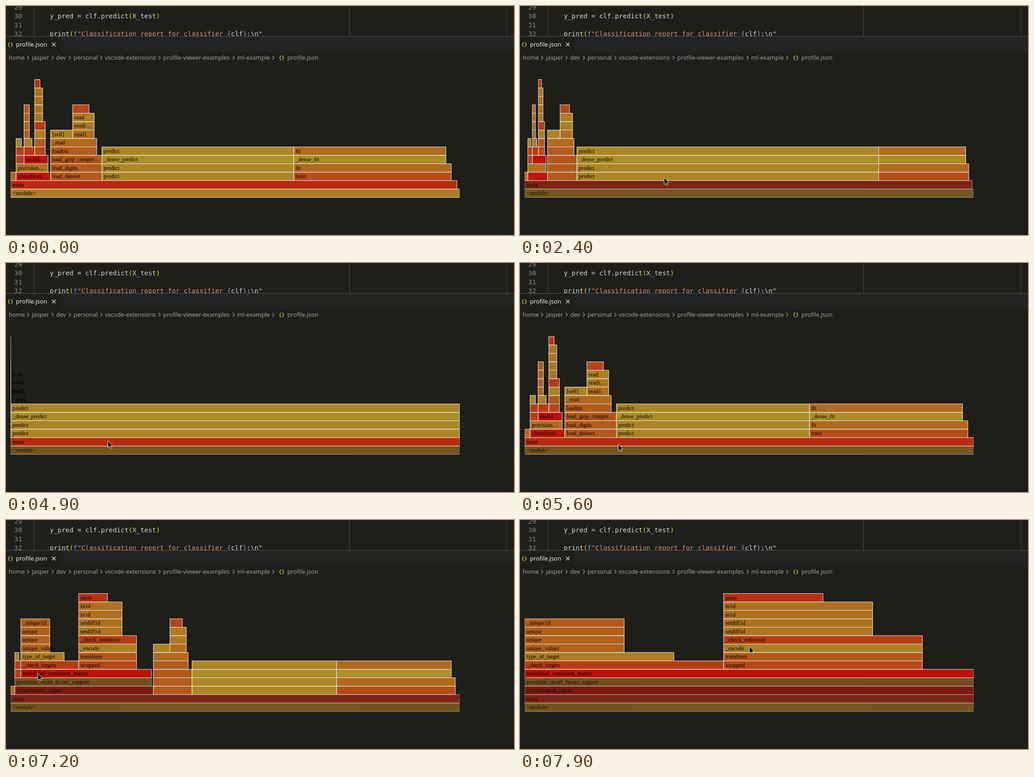
Recreate the animation shown at these times as an HTML page. Size 1114 px wide and 503 px high, loop 8 s.

```html
<!DOCTYPE html>
<html lang="en">
<head>
<meta charset="utf-8">
<title>Flame graph zoom</title>
<style>
  html, body { margin: 0; width: 100%; height: 100%; overflow: hidden; background: #1e1e1a; }
  #stage { display: block; width: 1114px; height: 503px; }
  text { white-space: pre; }
  .code { font: 14.35px "DejaVu Sans Mono", monospace; fill: #d4d4d4; }
  .num { fill: #858585; }
  .paren { fill: #ffd700; }
  .str { fill: #ce9178; }
  .brace { fill: #c586c0; }
  .ui { font: 13.05px "Open Sans", "Noto Sans", sans-serif; fill: #a9a9a6; }
  .icon { font: bold 11px "DejaVu Sans Mono", monospace; fill: #c5bd3c; }
  .graph rect { stroke: #eee; stroke-width: 1; fill-opacity: .8; }
  .graph text { font: 12.35px "Liberation Serif", serif; fill: #000; }
</style>
</head>
<body>
<svg id="stage" viewBox="0 0 1114 503">
  <defs>
    <clipPath id="pane"><rect width="1114" height="66"/></clipPath>
    <clipPath id="chart"><rect x="10.5" y="130" width="984" height="291"/></clipPath>
  </defs>
  <rect width="1114" height="503" fill="#1e1e1a"/>

  <g class="code" clip-path="url(#pane)">
    <path d="M62 0V66M1098.500 0V66" stroke="#484846"/>
    <path d="M753.500 0V66" stroke="#50504e"/>
    <g class="num">
      <text x="18" y="7.500">29</text>
      <text x="18" y="27">30</text>
      <text x="18" y="46.500">31</text>
      <text x="18" y="66">32</text>
    </g>
    <text x="96" y="26.500">y_pred = clf.predict<tspan class="paren">(</tspan>X_test<tspan class="paren">)</tspan></text>
    <text x="96" y="66">print<tspan class="paren">(</tspan><tspan fill="#569cd6">f</tspan><tspan class="str">"Classification report for classifier </tspan><tspan class="brace">{</tspan>clf<tspan class="brace">}</tspan>:\n"</text>
  </g>

  <rect x="119.500" y="68" width="995" height="33.500" fill="#222423"/>
  <rect y="66" width="1114" height="1.500" fill="#484846"/>
  <text class="icon" x="3" y="88">{}</text>
  <text class="ui" x="22" y="89" style="fill:#fff">profile.json</text>
  <path d="M101 80.500l8 8m0-8l-8 8" stroke="#e4e4e2" stroke-width="1.300"/>
  <g id="crumbs"></g>
  <text class="icon" x="598" y="117">{}</text>

  <g id="graph" class="graph" clip-path="url(#chart)"></g>
  <path id="cursor" d="M0 0V15.500L3.600 12.200L6 17.300L8.200 16.300L6 11.300H10.800Z"
        fill="#0c0c0c" stroke="#e8e8e8" stroke-linejoin="round"/>
</svg>
<script>
const LOOP = 8000, STEP = 100, ZOOM_MS = 750, LAG = 2;
const LEFT = 10.5, WIDTH = 984, ROW = 18.5, BASE_Y = 402;
const MIN_LABEL = 38, PAD = 4;

const $ = id => document.getElementById(id);
const clamp = v => Math.min(1, Math.max(0, v));
const lerp = (a, b, k) => a + (b - a) * k;
const ease = k => k < .5 ? 4 * k ** 3 : 1 - 4 * (1 - k) ** 3;

function add(parent, tag, attrs = {}, text = '') {
  const el = document.createElementNS('http://www.w3.org/2000/svg', tag);
  for (const key in attrs) el.setAttribute(key, attrs[key]);
  el.textContent = text;
  return parent.appendChild(el);
}

// Breadcrumbs
const crumbs = [['home', 6], ['jasper', 57], ['dev', 110], ['personal', 148],
  ['vscode-extensions', 217], ['profile-viewer-examples', 345], ['ml-example', 507],
  ['profile.json', 617]];
for (const [word, x] of crumbs) add($('crumbs'), 'text', { class: 'ui', x, y: 118 }, word);
for (const x of [48.5, 102, 140, 209, 336.5, 499, 586])
  add($('crumbs'), 'path', { d: `M${x - 2} 109.5l4 4l-4 4`, fill: 'none', stroke: '#a0a09e', 'stroke-width': 1.1 });

// Call tree: [name, samples, heat, ...children]; a lower heat is redder.
const chain = (...nodes) => nodes.reduceRight((child, node) => child ? [...node, child] : node, null);

const targets = chain(['_check_targets', 4, 60], ['type_of_target', 3, 127], ['unique_values', 2, 97],
  ['unique', 2, 98], ['unique', 2, 96], ['_unique1d', 2, 90]);
const wrapped = chain(['wrapped', 4, 72], ['transform', 4, 90], ['_encode', 4, 128],
  ['_check_unknown', 4, 60], ['setdiff1d', 3, 117], ['setdiff1d', 3, 115],
  ['in1d', 3, 112], ['in1d', 3, 113], ['amin', 2, 48]);
const checks = chain(['', 3, 62], ['', 3, 62], ['', 2, 128]);
const report = chain(['classification_report', 13, 22], ['precision_recall_fscore_support', 12.03, 112,
  checks, ['multilabel_confusion_matrix', 9.03, 17, targets, wrapped]]);
const reader = chain(['read1', 8.15, 110], ['readinto', 8.15, 124], ['read', 8.15, 124], ['', 6.2, 68]);
const load = chain(['load_dataset', 19.36, 90], ['load_digits', 19.36, 92],
  ['load_gzip_compressed_csv', 19.36, 88], ['loadtxt', 17.4, 92],
  ['_read', 17.4, 106, ['[self]', 8.3, 130], reader]);
const predict = chain(['predict', 72.31, 133], ['predict', 72.31, 133],
  ['_dense_predict', 72.31, 142], ['predict', 72.31, 133]);
const train = chain(['train', 59.36, 77], ['fit', 59.36, 106], ['_dense_fit', 57.36, 142], ['fit', 57.36, 106]);
const tree = ['<module>', 169.16, 124, ['main', 168.16, 43, ['', 2, 106], report, load, predict, train]];

// The fill is drawn at 80% over the page, so the page's share is taken out first.
function fill(heat) {
  const shown = [190 - (heat - 17) * .15, heat, 12 + (heat - 17) * .22];
  const page = [30, 30, 26];
  return `rgb(${shown.map((c, i) => Math.round((c - .2 * page[i]) / .8))})`;
}

const nodes = [];
function build([name, size, heat, ...kids], from, depth) {
  const y = BASE_Y - ROW * depth;
  const g = add($('graph'), 'g');
  const rect = add(g, 'rect', { y, height: ROW, fill: fill(heat) });
  const label = add(g, 'text', { y: y + 13.2 });
  nodes.push({ name, from, to: from + size, depth, g, rect, label });
  for (const kid of kids) {
    build(kid, from, depth + 1);
    from += kid[1];
  }
}
build(tree, 0, 0);

const pen = document.createElement('canvas').getContext('2d');
pen.font = '12.35px "Liberation Serif", serif';
function fit(text, room) {
  const wide = s => pen.measureText(s).width > room;
  if (!wide(text)) return text;
  while (text && wide(text + '…')) text = text.slice(0, -1);
  return text + '…';
}

// Position of every node when one node fills the chart
function layout(focus) {
  const place = v => clamp((v - focus.from) / (focus.to - focus.from)) * WIDTH;
  return nodes.map(n => {
    const x = place(n.from), w = place(n.to) - x;
    return {
      x: LEFT + x, w,
      text: w < MIN_LABEL ? '' : fit(n.name, w - 2 * PAD),
      faded: n.depth < focus.depth && w > WIDTH - .01
    };
  });
}

const named = name => nodes.find(n => n.name === name);
const views = [[-ZOOM_MS - LAG, '<module>'], [2042, 'predict'], [4890, 'main'], [6900, 'multilabel_confusion_matrix']]
  .map(([at, name]) => ({ at, boxes: layout(named(name)) }));

// Pointer moves: [start, end, x, y]
const moves = [
  [400, 500, 633, 45], [500, 600, 499.5, 212], [700, 900, 363.5, 308], [1000, 1100, 362.5, 310],
  [1200, 1500, 316, 375], [1700, 1800, 316, 377], [2700, 2900, 300, 328], [3100, 3400, 243, 341],
  [3500, 3700, 239, 349], [3800, 4000, 224, 404], [4200, 4300, 223.5, 390.5], [5400, 5600, 215.5, 397.5],
  [5600, 5700, 127, 377], [5700, 6400, 69.5, 336.5], [7700, 7900, 503, 277.5]
];

function drawGraph(now) {
  const i = views.findLastIndex(v => now >= v.at);
  const next = views[i].boxes, prev = views[Math.max(0, i - 1)].boxes;
  const k = ease(clamp((now - views[i].at - LAG) / ZOOM_MS));
  nodes.forEach((n, j) => {
    const a = prev[j], b = next[j], x = lerp(a.x, b.x, k);
    n.rect.setAttribute('x', x);
    n.rect.setAttribute('width', Math.max(0, lerp(a.w, b.w, k)));
    n.label.setAttribute('x', x + PAD);
    if (n.label.textContent !== b.text) n.label.textContent = b.text;
    n.g.setAttribute('opacity', b.faded ? .6 : 1);
  });
}

function drawCursor(now) {
  const shown = now >= moves[0][1];
  $('cursor').style.display = shown ? '' : 'none';
  if (!shown) return;
  const i = moves.findLastIndex(m => now >= m[0]);
  const [start, end, x, y] = moves[i];
  const [, , fromX, fromY] = moves[Math.max(0, i - 1)];
  const k = clamp((now - start) / (end - start));
  $('cursor').setAttribute('transform', `translate(${lerp(fromX, x, k)} ${lerp(fromY, y, k)})`);
}

const begin = performance.now();
function frame() {
  const time = (performance.now() - begin) % LOOP;
  const now = Math.floor(time / STEP) * STEP;
  drawGraph(now);
  drawCursor(now);
  requestAnimationFrame(frame);
}
frame();
</script>
</body>
</html>
```
